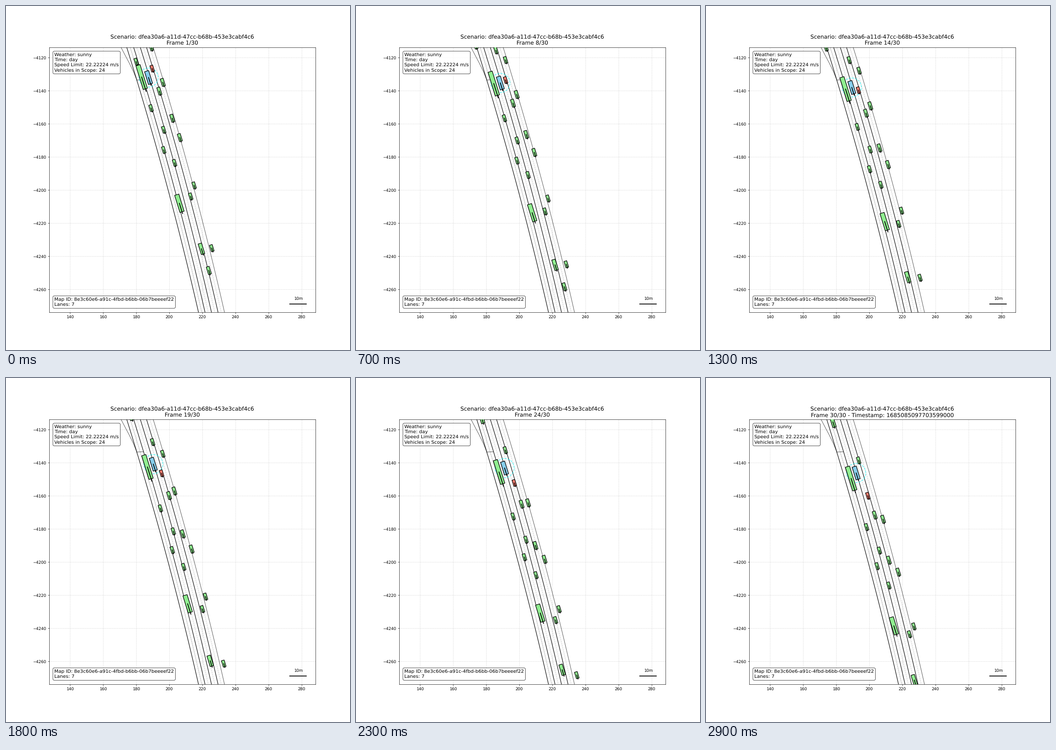
A matplotlib script for the animation above (3000 ms loop, 748 by 748 pixels).

```python
import matplotlib.pyplot as plt
import numpy as np
from matplotlib.animation import FuncAnimation
from matplotlib.patches import Circle, Polygon
from matplotlib.transforms import Affine2D

SIZE = 748
FRAMES = 30
SCALE = 3.6                      # stage pixels per metre
TOP, BOTTOM = 89.8, 665.7        # plot area on the stage
ROAD_BOW = 6.0                   # sideways bulge of the road, pixels
HEADING = np.array([0.296, 0.955])
NORMAL = np.array([HEADING[1], -HEADING[0]])

plt.rcParams["font.family"] = "DejaVu Sans"
plt.rcParams["text.hinting"] = "none"
fig = plt.figure(figsize=(12, 12), dpi=SIZE / 12, facecolor="white")
ax = fig.add_axes([0.125, 0.11, 0.775, 0.77])
ax.set_xlim(207.9 - 80.515, 207.9 + 80.515)
ax.set_ylim(-4273.82, -4113.82)
ax.set_autoscale_on(False)
ax.grid(True, linestyle="--", alpha=0.5)

# Stage pixels (y down) to world metres
stage = Affine2D().scale(1 / SCALE, -1 / SCALE).translate(101.413, -4088.887) + ax.transData


def stroke(xs, ys, **style):
    return ax.plot(xs, ys, transform=stage, **style)[0]


def road_line(x_top, x_bottom, **style):
    t = np.linspace(0, 1, 60)
    x = x_top + (x_bottom - x_top) * t + 4 * ROAD_BOW * t * (1 - t)
    stroke(x, TOP + (BOTTOM - TOP) * t, **style)


# Road
tops = [262.5, 277.5, 292, 305.5, 320]
bottoms = [418.5, 432.7, 446.7, 461, 475]
thin = dict(color="black", lw=1, alpha=0.75)
centre = dict(color="gray", lw=1, ls="--", alpha=0.5)
for i, (a, b) in enumerate(zip(tops, bottoms)):
    style = thin if i == 4 else dict(color="black", lw=1.3)
    road_line(a, b, **style)
    if i < 4:
        mid = (a + tops[i + 1]) / 2, (b + bottoms[i + 1]) / 2
        road_line(*mid, **centre)
        if i == 0:
            road_line(*mid, color="gray", lw=0.7, alpha=0.5)
stroke([250, 259, 268, 277, 284.5], [TOP, 107, 124, 142.5, 161], **thin)
stroke([284.5, 299], [161, 160.2], **thin)

# Labels
box = dict(boxstyle="round", facecolor="white", alpha=0.8)
ax.text(0.02, 0.98,
        "Weather: sunny\nTime: day\nSpeed Limit: 22.22224 m/s\nVehicles in Scope: 24",
        transform=ax.transAxes, fontsize=12, va="top", bbox=box, zorder=10)
ax.text(0.02, 0.02,
        "Map ID: 8e3c60e6-a91c-4fbd-b6bb-06b7beeeef22\nLanes: 7",
        transform=ax.transAxes, fontsize=12, va="bottom", bbox=box, zorder=10)
ax.plot([272.9, 282.9], [-4268.82] * 2, color="black", lw=2)
ax.text(277.9, -4266.82, "10m", ha="center", va="bottom", fontsize=10)
title = ax.set_title("", fontsize=14)

# kind: length, width, fill
KINDS = {
    "ego": (29, 9.3, "skyblue"),
    "red": (14.3, 6.2, "salmon"),
    "car": (14.6, 6.2, "lightgreen"),
    "long": (17, 6.6, "lightgreen"),
    "van": (24, 7.8, "lightgreen"),
    "truck": (39, 9.6, "lightgreen"),
    "trailer": (54, 9.6, "lightgreen"),
}

# kind, start x, y, end x, y, lag or lead at mid-way, last frame shown
TRACKS = [
    ("car", 283, 121, 301, 179, 0, 6),
    ("trailer", 295, 154.5, 315.5, 218.5, -1, 29),
    ("ego", 310, 155.5, 326.5, 206.5, 0, 29),
    ("red", 318, 136, 352, 256, -4, 29),
    ("long", 333.5, 185, 367, 298, 0, 29),
    ("long", 341, 166, 385, 307, -9, 29),
    ("long", 361.5, 244, 397.5, 396, 0, 29),
    ("long", 378, 286, 418, 422, 1, 29),
    ("car", 315.5, 222, 349, 324, -2.5, 29),
    ("car", 343, 269, 377, 375, -2, 29),
    ("car", 343, 313, 372, 409, 1, 29),
    ("car", 366.5, 341, 397.5, 451, 1, 29),
    ("car", 409, 390, 452, 540, -9, 29),
    ("car", 401.5, 414, 442.5, 557, -1, 29),
    ("truck", 377, 429, 408.5, 539, -7, 29),
    ("van", 425, 528, 453, 657, 7, 29),
    ("car", 447.5, 526.5, 488.5, 678, 0, 29),
    ("long", 441, 575, 492, 728, 0, 9),
    ("car", 316, 90, 356, 211, -1, 20),
    ("car", 295.5, 70.4, 332, 179, 1, 29),
    ("car", 259.5, 81, 263, 103, 0, 15),
    ("van", 263, 55, 276, 95.5, 0, 29),
]


def progress(n):
    """Share of each track covered; the recording is sampled unevenly."""
    t = np.interp(n, [0, 4, 6, 9, 13, 18, 23, 29], [0, 3.1, 5.6, 9, 12.3, 18.1, 22.9, 29])
    return t / 29


class Vehicle:
    def __init__(self, kind, x0, y0, x1, y1, bow, last):
        self.length, self.width, fill = KINDS[kind]
        self.track = x0, y0, x1, y1, bow
        self.last = last
        self.body = ax.add_patch(Polygon(np.zeros((4, 2)), facecolor=fill, edgecolor="black",
                                         lw=1.5, transform=stage, zorder=4))
        self.nose = stroke([], [], color="black", lw=2, zorder=5)
        self.halo = None
        if kind == "ego":
            self.halo = ax.add_patch(Circle((0, 0), 20.8, fill=False, edgecolor="cyan", lw=1.5,
                                            ls="--", alpha=0.7, transform=stage, zorder=3))

    def centre(self, n):
        x0, y0, x1, y1, bow = self.track
        t = progress(n)
        y = y0 + (y1 - y0) * t + 4 * bow * t * (1 - t)
        bend = 4 * ROAD_BOW / (BOTTOM - TOP) ** 2 * (y - y0) * (y1 - y)
        return np.array([x0 + (x1 - x0) * (y - y0) / (y1 - y0) + bend, y])

    def place(self, n):
        c = self.centre(n)
        along, across = HEADING * self.length / 2, NORMAL * self.width / 2
        self.body.set_xy([c - along - across, c - along + across,
                          c + along + across, c + along - across])
        tip = c + HEADING * self.length * 0.6
        self.nose.set_data([c[0], tip[0]], [c[1], tip[1]])
        if self.halo:
            self.halo.center = tuple(c)
        shown = n <= self.last
        self.body.set_visible(shown)
        self.nose.set_visible(shown)


vehicles = [Vehicle(*track) for track in TRACKS]


def draw(n):
    stamp = " - Timestamp: 1685085097703599000" if n == FRAMES - 1 else ""
    title.set_text("Scenario: dfea30a6-a11d-47cc-b68b-453e3cabf4c6\n"
                   f"Frame {n + 1}/{FRAMES}{stamp}")
    for v in vehicles:
        v.place(n)
    return []


anim = FuncAnimation(fig, draw, frames=FRAMES, interval=100, repeat=True, repeat_delay=0)
plt.show()
```
